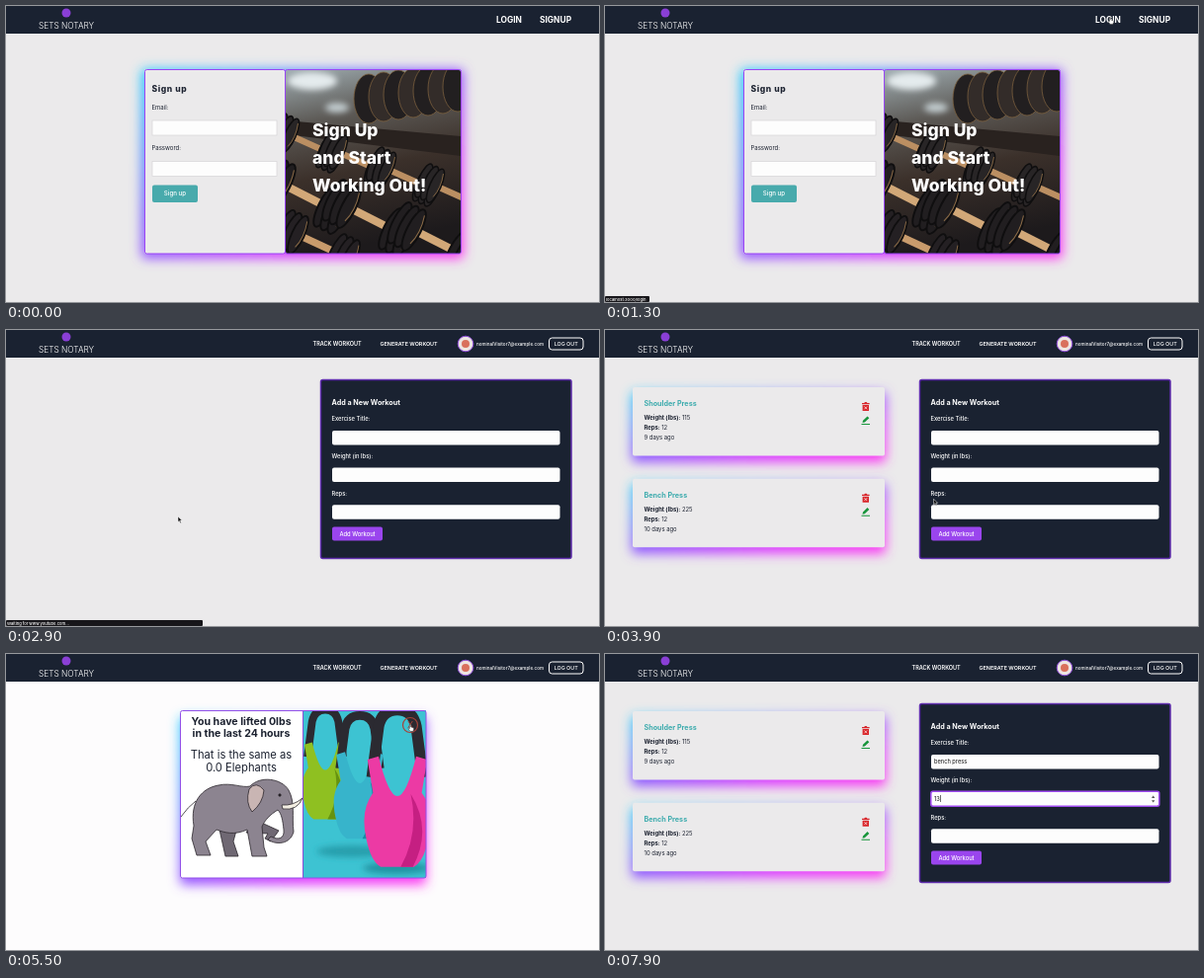
Animation of 600x300 px, one loop 8 s. Source, as an HTML page:

```html
<!DOCTYPE html>
<html lang="en">
<head>
<meta charset="utf-8">
<style>
  html, body { margin: 0; width: 100%; height: 100%; overflow: hidden; background: #ebeaeb; }
  svg { display: block; width: 600px; height: 300px; font-family: Inter, "Open Sans", sans-serif; }
</style>
</head>
<body>
<svg id="stage" viewBox="0 0 600 300" xmlns="http://www.w3.org/2000/svg"></svg>
<script>
const NAVY = '#1a2231', TEAL = '#48aaac', INK = '#1c2230', PAGE = '#ebeaeb';

// Markup helpers
const rect = (x, y, w, h, fill, extra = '') =>
  `<rect x="${x}" y="${y}" width="${w}" height="${h}" fill="${fill}" ${extra}/>`;
const text = (x, y, size, str, weight = 400, fill = INK, extra = '') =>
  `<text x="${x}" y="${y}" font-size="${size}" font-weight="${weight}" fill="${fill}" ${extra}>${str}</text>`;
const centered = 'text-anchor="middle"';
const group = (id, body) => `<g id="${id}">${body}</g>`;
const path = (d, fill, extra = '') => `<path d="${d}" fill="${fill}" ${extra}/>`;
const ellipse = (x, y, rx, ry, fill, extra = '') =>
  `<ellipse cx="${x}" cy="${y}" rx="${rx}" ry="${ry}" fill="${fill}" ${extra}/>`;
const glow = (x, y, w, h) => rect(x, y, w, h, 'url(#neon)', 'rx="4" filter="url(#blur)"');
const button = (x, y, w, h, label, fill, size = 6) =>
  rect(x, y, w, h, fill, 'rx="2"') + text(x + w / 2, y + h / 2 + 2, size, label, 500, '#fff', centered);

function dumbbell(x, y, scale, angle, metal, grip) {
  const discs = [-40, -32, -24, 24, 32, 40].map(dx =>
    ellipse(dx, 0, 7, 23, metal, 'stroke="#0f0e0f" stroke-width="2"') +
    path(`M${dx + 3} -18Q${dx + 8} 0 ${dx + 3} 14`, 'none', 'stroke="#8a6a45" stroke-width="1"')).join('');
  return `<g transform="translate(${x} ${y}) rotate(${angle}) scale(${scale})">` +
    rect(-24, -4, 48, 8, grip) + discs + '</g>';
}

function rackPhoto() {
  let s = rect(283, 65, 177, 186, 'url(#rack)');
  s += ellipse(310, 76, 25, 9, '#e4ebed', 'filter="url(#soft)"') +
       ellipse(432, 71, 28, 5, '#dce7ec', 'filter="url(#soft)"') +
       ellipse(335, 103, 12, 5, '#c3cdd0', 'filter="url(#soft)"');
  for (let i = 0; i < 7; i++)
    s += ellipse(367 + i * 15, 94 - i * 2, 15, 25, i % 2 ? '#332c29' : '#221f20', 'stroke="#7c603e" stroke-width=".8"');
  s += path('M283 116L460 132V152L283 130Z', '#29221f');
  for (let i = 0; i < 4; i++)
    s += dumbbell(305 + i * 49, 139 + i * 17, .8, 24, '#282526', '#bb8f62');
  for (let i = 0; i < 3; i++)
    s += dumbbell(302 + i * 66, 192 + i * 23, 1, 27, '#211e20', '#d2a878');
  return s + dumbbell(315, 241, .9, 25, '#242023', '#c89b6c');
}

function aislePhoto() {
  let s = rect(283, 65, 177, 186, 'url(#aisle)');
  for (const x of [298, 332, 389, 425]) s += rect(x, 66, 17, 35, '#aeb0a6', 'filter="url(#soft)"');
  s += path('M283 65h10v70h-10zM318 65h6v50h-6zM376 65h5v45h-5zM445 65h15v75h-15z', '#373a39');
  s += path('M360 110h22l24 141h-70z', '#596166');
  for (let i = 0; i < 7; i++) {
    const k = .3 + i * .14, y = 110 + i * i * 2.2 + i * 9;
    for (const side of [-1, 1]) {
      const x = 371 + side * (17 + i * 6);
      s += rect(x - 22 * k, y - 4 * k, 44 * k, 8 * k, '#9da5a8');
      for (const dx of [-25, 25])
        s += rect(x + dx * k - 13 * k, y - 18 * k, 26 * k, 36 * k, '#272c2f',
          `rx="${8 * k}" stroke="#6c7579" stroke-width=".8"`);
    }
  }
  return s;
}

function kettlebell(x, y, k, body, shade) {
  return `<g transform="translate(${x} ${y}) scale(${k})">` +
    path('M-23 -42L-17 -88Q-14 -103 0 -103Q14 -103 17 -88L23 -42', 'none', 'stroke="#2b2a31" stroke-width="10"') +
    path('M-27 -58L-17 -61Q-8 -25 0 -25Q8 -25 17 -61L27 -58L22 -28Q34 -12 28 14Q24 34 15 39H-15Q-24 34 -28 14Q-34 -12 -22 -28Z', body) +
    path('M12 -27Q32 5 14 39H3Q20 8 12 -27Z', shade) + '</g>';
}

const elephant = `<g stroke="#2b262d" stroke-width=".8" stroke-linejoin="round">` +
  path('M192 149Q184 155 177 165', 'none') +
  path('M236 168L230 190L235 205H222L216 178ZM252 168L276 179L268 190L262 187L265 182L243 181Z', '#6f6873') +
  path('M190 174C186 150 198 136 215 133C228 130 239 136 247 134C257 123 279 126 286 138C293 151 289 165 291 180C288 193 273 194 265 188L268 185C276 189 282 187 281 178C280 169 279 162 275 158C267 163 262 168 259 175L261 196L264 205H249L244 178C231 184 221 181 213 178L202 190L207 204H193L188 187Z', '#8c8490') +
  path('M246 137Q253 128 261 138Q260 151 249 160Q242 151 246 137Z', '#c9b5b3') +
  path('M279 153Q291 154 300 146Q295 159 280 157Z', '#f3eee2') +
  ellipse(277, 143, 1.2, 1.2, '#1d1a1f') + '</g>';

function authPage(id, title, cardFill, buttons, photo, headline) {
  const fields = [['Email:', 105, 116], ['Password:', 146, 157.5]].map(([label, ty, y]) =>
    text(147.5, ty, 6, label) + rect(148, y, 126, 15, '#fdfdfd', 'stroke="#d6d5d8" stroke-width=".7"')).join('');
  return group(id,
    text(496, 17, 8.4, 'LOGIN', 700, '#fff') + text(540, 17, 8.4, 'SIGNUP', 700, '#fff') +
    glow(137, 64, 326, 192) + rect(140, 64, 142, 187, cardFill, 'rx="2"') +
    text(147.5, 87, 8.5, title, 800, INK, 'letter-spacing=".6"') + fields + buttons +
    `<g clip-path="url(#photoClip)">${photo}</g>` + headline +
    rect(140.5, 64.5, 142, 186.5, 'none', 'rx="2" stroke="#9a45f5"') +
    rect(282.5, 64.5, 178, 186.5, 'none', 'rx="2" stroke="#9a45f5"'));
}

function workoutCard(y, title, weight, age) {
  const pair = (dy, label, value) => text(39.5, y + dy, 5.9, `${label} <tspan font-weight="400">${value}</tspan>`, 700);
  return glow(27, y + 5, 257, 71) + rect(28, y, 255, 69.5, PAGE, 'rx="2"') +
    text(39.5, y + 19, 7.2, title, 700, '#3cabad') +
    pair(33.3, 'Weight (lbs):', weight) + pair(43.3, 'Reps:', 12) + text(39.5, y + 53.3, 5.9, age) +
    path(`M260 ${y + 16}h2.2l.8 -1h1.6l.8 1h2.2v1.3h-7.6zM260.6 ${y + 18}h6.4v6h-6.4z`, '#d9262b') +
    path(`M262.4 ${y + 19.5}l2.8 2.8m0 -2.8l-2.8 2.8`, 'none', 'stroke="#fff" stroke-width=".7"') +
    path(`M260.5 ${y + 36}l.5 -2.3l4.5 -4.3l1.8 1.8l-4.5 4.3zM259.5 ${y + 37}h8.5v1h-8.5z`, '#17953b');
}

const formFields = [['Exercise Title:', 92, 102], ['Weight (in lbs):', 130, 139.5], ['Reps:', 167.5, 177.2]];
const form = rect(318.5, 50.5, 253.5, 181, NAVY, 'rx="2" stroke="#5d2bab" stroke-width="1.5"') +
  text(329.5, 76, 7.2, 'Add a New Workout', 700, '#fff') +
  formFields.map(([label, ty, y]) =>
    text(329.5, ty, 5.8, label, 500, '#fff') + rect(330, y, 230.5, 14.5, '#fdfdfd', 'rx="2"')).join('') +
  button(330, 199.5, 51, 14, 'Add Workout', '#9a45ee', 5.8) +
  rect(329.8, 0, 231, 15, 'none', 'id="focus" rx="2" stroke="#a04cf0" stroke-width="1.5"') +
  text(333, 110.8, 5.7, '', 400, '#111', 'id="exercise"') +
  text(333, 148.5, 5.7, '', 400, '#111', 'id="pounds"') +
  rect(0, 0, .6, 7, '#111', 'id="caret"') +
  group('spinner', path('M553 146l1.7 -2.4l1.7 2.4zM553 148.2l1.7 2.4l1.7 -2.4z', '#555'));

const memberNav =
  text(310.5, 16, 5.5, 'TRACK WORKOUT', 600, '#fff') + text(378.5, 16, 5.4, 'GENERATE WORKOUT', 600, '#fff') +
  ellipse(465, 14, 7.8, 7.8, '#eee6e2', 'stroke="#8d4bd8"') + ellipse(465, 14, 4, 4, '#d9705c') +
  text(476, 15.7, 4.6, 'nominalVisitor7@example.com', 500, '#fff') +
  rect(549.5, 8, 34.5, 12, 'none', 'rx="3" stroke="#fff"') + text(566.7, 16, 5.4, 'LOG OUT', 500, '#fff', centered);

const summary = rect(0, 28, 600, 272, '#fdfcfd') + glow(176, 64, 249, 170) +
  rect(176, 57, 249, 170, '#fff', 'rx="2"') +
  text(238, 72, 10.6, 'You have lifted 0lbs', 700, INK, centered) +
  text(238, 84.3, 10.6, 'in the last 24 hours', 700, INK, centered) +
  text(238, 106, 11.2, 'That is the same as', 400, INK, centered) +
  text(238, 118.8, 11.2, '0.0 Elephants', 400, INK, centered) + elephant +
  `<g clip-path="url(#bellClip)">` + rect(300, 57, 125, 170, '#3dc3d2') +
  ellipse(350, 200, 36, 6, '#279eac', 'filter="url(#soft)"') + ellipse(395, 217, 34, 6, '#2493a1', 'filter="url(#soft)"') +
  kettlebell(323, 137, .78, '#8fc021', '#66920f') + kettlebell(358, 153, .88, '#37b4cb', '#1b8aa5') +
  kettlebell(396, 172, 1.12, '#ec3aa4', '#c51f82') + '</g>' +
  path('M300.5 57V227', 'none', 'stroke="#8b4bd8"') +
  rect(176.5, 57.5, 248.5, 169.5, 'none', 'rx="2" stroke="#9250e8"') +
  ellipse(409, 72, 7.5, 7.5, 'none', 'stroke="#a6423a" stroke-width="1.2"') +
  text(409, 75.3, 9, 'X', 400, '#a6423a', centered);

const white = (x, y, str) => text(x, y, 17.5, str, 800, '#fff');
const stage = document.getElementById('stage');
stage.innerHTML = `<defs>
  <linearGradient id="neon" x2="1" y2="1"><stop stop-color="#25cfff"/><stop offset=".4" stop-color="#7a63ff"/>
    <stop offset=".75" stop-color="#e23cff"/><stop offset="1" stop-color="#ff3df0"/></linearGradient>
  <linearGradient id="rack" x2=".2" y2="1"><stop stop-color="#9facb1"/><stop offset=".3" stop-color="#5c5955"/>
    <stop offset=".6" stop-color="#3b302a"/><stop offset="1" stop-color="#1d1a1c"/></linearGradient>
  <linearGradient id="aisle" x2="0" y2="1"><stop stop-color="#7c7f79"/><stop offset=".3" stop-color="#55595a"/>
    <stop offset="1" stop-color="#23282b"/></linearGradient>
  <filter id="blur" x="-20%" y="-40%" width="140%" height="180%"><feGaussianBlur stdDeviation="6"/></filter>
  <filter id="soft" x="-50%" y="-80%" width="200%" height="260%"><feGaussianBlur stdDeviation="3"/></filter>
  <clipPath id="photoClip"><rect x="283" y="65" width="177" height="186" rx="2"/></clipPath>
  <clipPath id="bellClip"><rect x="300" y="57" width="125" height="170"/></clipPath></defs>` +
  rect(0, 0, 600, 300, PAGE) + rect(0, 0, 600, 28, NAVY) +
  ellipse(61, 7, 4.5, 4.5, '#8a3fd6') + text(33, 22.5, 8.3, 'SETS NOTARY', 300, '#fff') +
  authPage('signup', 'Sign up', PAGE, button(148, 181.5, 46, 17.5, 'Sign up', TEAL, 6.2), rackPhoto(),
    white(310, 132, 'Sign Up') + white(310, 160, 'and Start') + white(310, 187.5, 'Working Out!')) +
  authPage('login', 'Log in', '#fdfcfd',
    button(148, 181.5, 62, 17.5, 'Log in as guest', TEAL) + button(246.5, 181.5, 28, 17.5, 'Log in', TEAL),
    aislePhoto(), white(302, 155, 'Welcome Back!')) +
  group('member', memberNav + form +
    group('cards', workoutCard(58, 'Shoulder Press', 115, '9 days ago') + workoutCard(150.7, 'Bench Press', 225, '10 days ago')) +
    group('summary', summary)) +
  group('status', rect(0, 294, 45, 6, '#17161a', 'id="statusBar" rx="1"') + text(1, 298.6, 4.1, '', 500, '#fff', 'id="statusText"')) +
  group('pointer',
    group('arrow', path('M0 0V5.6L1.3 4.5L2.3 6.7L3.3 6.2L2.3 4.1H4.1Z', '#111', 'stroke="#fff" stroke-width=".5"')) +
    group('hand', path('M-.6 -.5Q.2 -1 .7 0V2L3 2.6Q3.9 3 3.6 4.4L3 6.4H0L-1.9 3.8Q-1.7 2.9 -.6 3.6Z', '#fff', 'stroke="#222" stroke-width=".5"')) +
    group('beam', path('M-1.2 -2.6H1.2M0 -2.6V3.2M-1.2 3.2H1.2', 'none', 'stroke="#222" stroke-width=".7"')));

const $ = id => document.getElementById(id);
const show = (id, on) => $(id).style.display = on ? '' : 'none';
const between = (t, a, b) => t >= a && t < b;

// Pointer stops: time, x, y
const stops = [[500, 582, 6], [1100, 511, 12], [1500, 511, 12], [2100, 168, 199.5], [2300, 168, 199.5],
  [2500, 174, 189], [3100, 174, 189], [4300, 388, 165], [4900, 388, 165], [5400, 409, 72], [5600, 409, 72], [5900, 402.5, 111]];

function pointerAt(t) {
  const i = stops.findIndex(s => s[0] > t);
  if (i < 1) return (i ? stops[stops.length - 1] : stops[0]).slice(1);
  const [a, b] = [stops[i - 1], stops[i]];
  const p = (t - a[0]) / (b[0] - a[0]), e = p * p * (3 - 2 * p);
  return [a[1] + (b[1] - a[1]) * e, a[2] + (b[2] - a[2]) * e];
}

function render(t) {
  show('signup', t < 1500);
  show('login', between(t, 1500, 2800));
  show('member', t >= 2800);
  show('cards', t >= 3200);
  show('summary', between(t, 4600, 5600));

  const linkHint = between(t, 1000, 1500);
  show('status', linkHint || between(t, 2000, 3500));
  $('statusBar').setAttribute('width', linkHint ? 45 : 199);
  $('statusText').textContent = linkHint ? 'localhost:3000/login'
    : t < 2800 ? 'Waiting for trybusiness.site...' : 'Waiting for www.youtube.com...';

  // Typing
  const onPounds = t >= 7300;
  $('exercise').textContent = 'bench press'.slice(0, Math.max(0, (t - 6000) / 100));
  $('pounds').textContent = t >= 7900 ? '13' : t >= 7700 ? '1' : '';
  show('focus', t >= 5900);
  show('caret', t >= 5900);
  show('spinner', onPounds);
  $('focus').setAttribute('y', onPounds ? 139.3 : 101.8);
  const field = $(onPounds ? 'pounds' : 'exercise');
  $('caret').setAttribute('x', 333.4 + (field.textContent ? field.getComputedTextLength() : 0));
  $('caret').setAttribute('y', onPounds ? 143 : 105.5);

  const [x, y] = pointerAt(t);
  const hand = between(t, 1000, 1600) || between(t, 2500, 2800) || between(t, 5300, 5600);
  const beam = t >= 5800;
  show('pointer', between(t, 500, 6500));
  show('hand', hand);
  show('beam', beam);
  show('arrow', !hand && !beam);
  $('pointer').setAttribute('transform', `translate(${x} ${y})`);
}

function tick() {
  render(Math.floor(performance.now() % 8000 / 100) * 100);
  requestAnimationFrame(tick);
}
tick();
</script>
</body>
</html>
```
